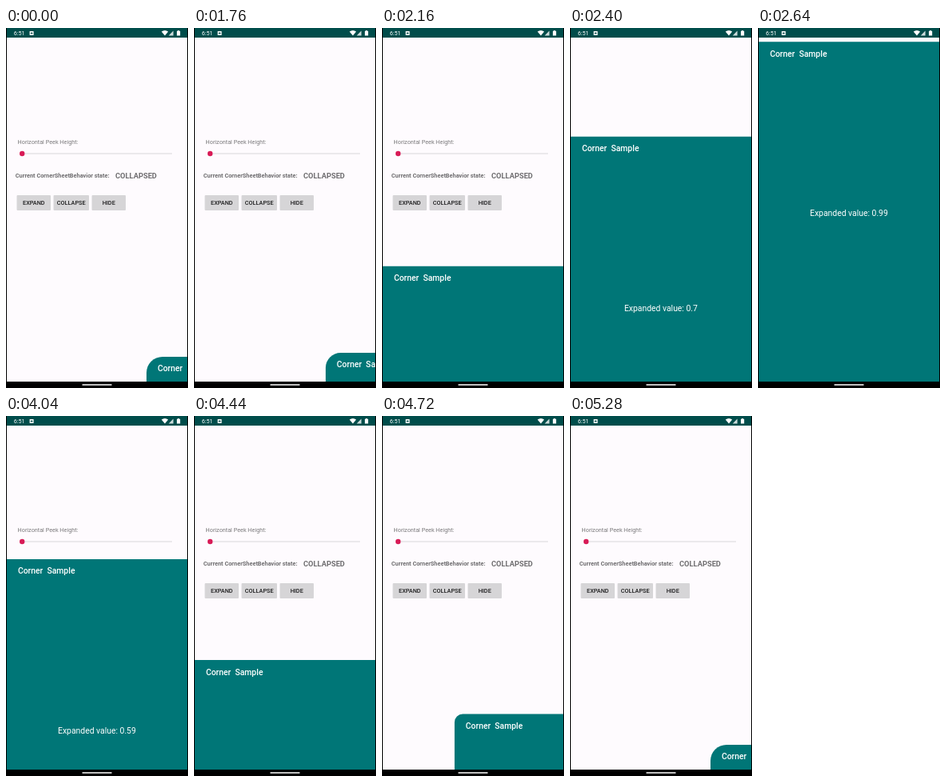
An HTML page that plays this animation: 228 by 450 pixels, repeating every 5320 ms.

```html
<!DOCTYPE html>
<html lang="en">
<head>
<meta charset="utf-8">
<title>Corner sheet</title>
<style>
  html, body { margin: 0; width: 100%; height: 100%; overflow: hidden; background: #000; }
  svg { display: block; width: 100%; height: 100%; font-family: Roboto, sans-serif; }
  text { white-space: pre; }
  .mid { text-anchor: middle; }
  .label { font-size: 7.25px; fill: #7b7a7c; }
  .state { font-weight: 700; font-size: 7.35px; fill: #6e6d6f; }
  .big { font-size: 9.3px; }
  .button rect { fill: #d6d5d7; }
  .button text { font-weight: 500; font-size: 7.3px; fill: #1d1d1e; }
  .sheet { fill: #007677; }
  .sheet-text { font-size: 10.4px; fill: #fff; }
  .title { font-weight: 500; }
</style>
</head>
<body>
<svg viewBox="0 0 228 450">
  <defs>
    <clipPath id="screen"><rect x="1" y="12" width="226" height="430"/></clipPath>
  </defs>
  <rect width="228" height="450"/>
  <rect x="1" y="12" width="226" height="430" fill="#fefbfe"/>

  <text class="label" x="14.6" y="145.2">Horizontal Peek Height:</text>
  <path d="M20 157H208" stroke="#d9d7da"/>
  <circle cx="20.2" cy="157" r="3.2" fill="#d81b57"/>
  <text class="state" x="11.8" y="187.4">Current CornerSheetBehavior state:</text>
  <text class="state big" x="137" y="187.6">COLLAPSED</text>

  <g class="button">
    <rect x="13.5" y="209" width="42.5" height="19" rx="1"/>
    <text class="mid" x="34.8" y="221.2">EXPAND</text>
  </g>
  <g class="button">
    <rect x="59.5" y="209" width="44.5" height="19" rx="1"/>
    <text class="mid" x="81.7" y="221.2">COLLAPSE</text>
  </g>
  <g class="button">
    <rect x="107.5" y="209" width="42.5" height="19" rx="1"/>
    <text class="mid" x="128.7" y="221.2">HIDE</text>
  </g>

  <g clip-path="url(#screen)">
    <path id="sheet" class="sheet"/>
    <text id="title" class="sheet-text title">Corner  Sample</text>
    <text id="value" class="sheet-text mid"></text>
  </g>

  <rect x="1" width="226" height="12" fill="#004d4b"/>
  <g fill="#fff">
    <text x="9.8" y="9" font-size="7.2">6:51</text>
    <rect x="29.6" y="4" width="5" height="5" rx=".6"/>
    <path d="M194.8 4.6Q199 1.6 203.2 4.6L199 9.4Z"/>
    <path d="M203.8 9.4L209.6 3.6V9.4Z" opacity=".8"/>
    <path d="M214 3.8H215.2V3H217V3.8H218.2V9.6H214Z"/>
    <rect x="95.3" y="445.2" width="37.4" height="1.5" rx=".7"/>
  </g>
  <path d="M32.1 5.1V7.9M30.7 6.5H33.5" stroke="#004d4b" stroke-width=".9"/>
</svg>
<script>
  const LOOP = 5320, STEP = 40;
  const RIGHT = 227, BOTTOM = 442;
  const PEEK_LEFT = 176, FULL_LEFT = 1, RADIUS = 20;
  const PEEK_TOP = 411, OPEN_TOP = 16.3, WIDEN = 79;

  // Each swipe eases the sheet's top edge to a new height.
  const swipes = [
    { from: 1725, until: 1960, to: 318 },
    { from: 2060, until: 2660, to: OPEN_TOP },
    { from: 3735, until: 4290, to: 298 },
    { from: 4345, until: 4880, to: 391.8 },
    { from: 5120, until: 5280, to: PEEK_TOP }
  ];

  const sheet = document.getElementById("sheet");
  const title = document.getElementById("title");
  const value = document.getElementById("value");

  const clamp = u => Math.min(1, Math.max(0, u));
  const ease = u => (1 - Math.cos(Math.PI * u)) / 2;

  function topAt(t) {
    return swipes.reduce(
      (top, { from, until, to }) => top + (to - top) * ease(clamp((t - from) / (until - from))),
      PEEK_TOP);
  }

  function place(el, x, y) {
    el.setAttribute("x", x);
    el.setAttribute("y", y);
  }

  function draw(t) {
    const top = topAt(t);
    const open = clamp((PEEK_TOP - top) / WIDEN);
    const left = PEEK_LEFT + (FULL_LEFT - PEEK_LEFT) * open;
    const r = RADIUS * (1 - open);
    sheet.setAttribute("d",
      `M${left} ${BOTTOM}V${top + r}A${r} ${r} 0 0 1 ${left + r} ${top}H${RIGHT}V${BOTTOM}Z`);
    place(title, left + 13.9, top + 18.4);
    place(value, 113.9, top + 218.2);
    value.textContent = "Expanded value: " + +clamp((422 - top) / 408.6).toFixed(2);
  }

  const start = performance.now();
  function tick() {
    const t = (performance.now() - start) % LOOP;
    draw(Math.floor(t / STEP) * STEP);
    requestAnimationFrame(tick);
  }
  tick();
</script>
</body>
</html>
```
